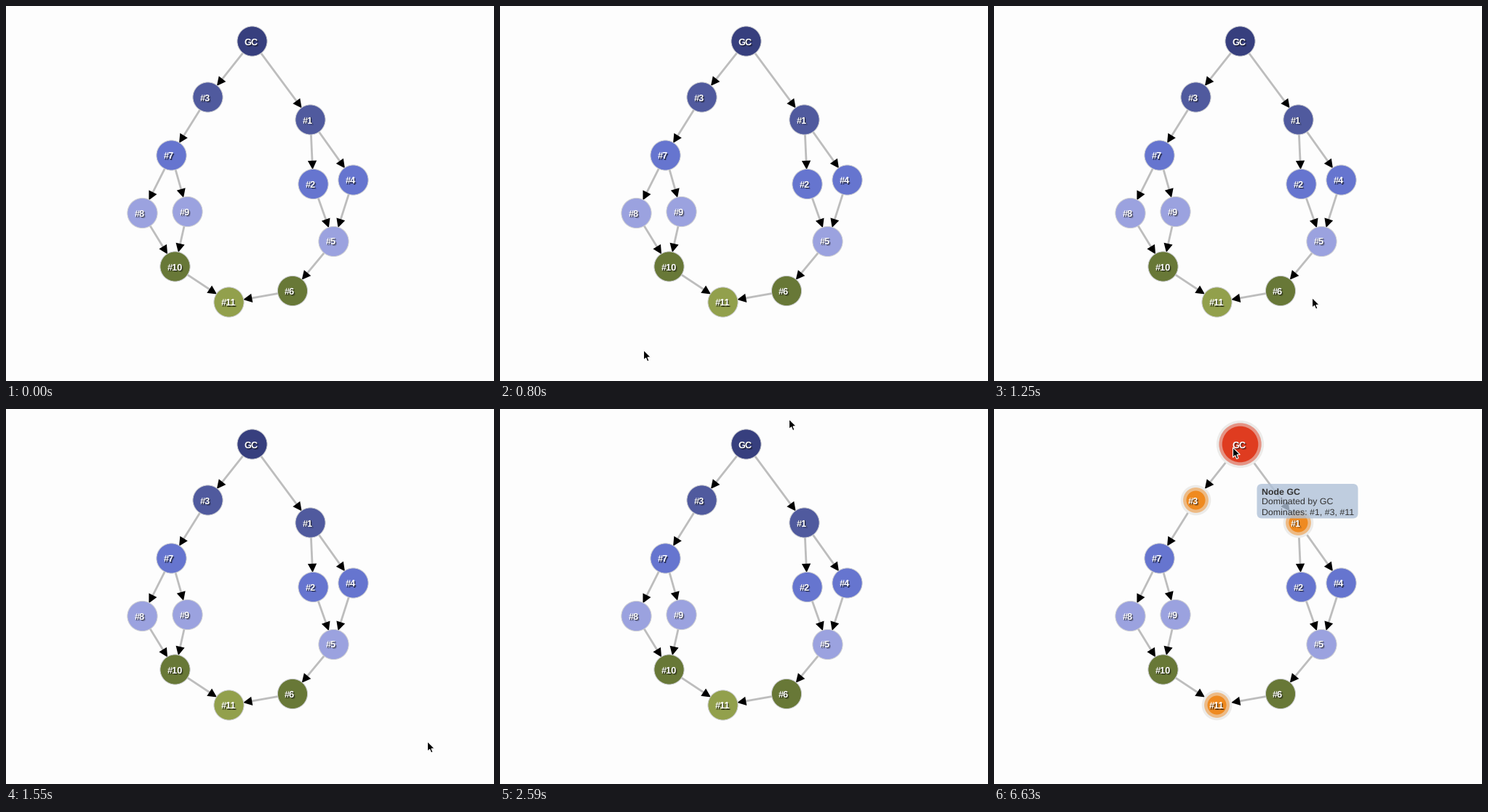
A matplotlib script that plays this animation: 671x516 px, repeating every 8 s.

```python
import matplotlib.pyplot as plt
import numpy as np
from matplotlib.animation import FuncAnimation
from matplotlib.patches import Circle, FancyBboxPatch, Polygon

W, H, DPI = 671, 516, 64
LOOP, STEP = 8000, 20
RADIUS, HEAD = 20.6, 12.3

PLACES = {
    "GC": (338, 48), "#1": (418, 156), "#2": (422, 244.5), "#3": (277, 125),
    "#4": (477, 239), "#5": (450, 323.5), "#6": (393.5, 391.5),
    "#7": (227, 205), "#8": (187, 284.5), "#9": (249, 282.5),
    "#10": (232, 358), "#11": (306, 407),
}
CHAINS = ["GC #3 #7 #8 #10 #11", "#7 #9 #10",
          "GC #1 #2 #5 #6 #11", "#1 #4 #5"]
DEPTH_COLORS = ["#373f7e", "#505a9e", "#6675cf", "#9ba2df",
                "#687837", "#92a04c"]
RED, ORANGE, HALO = "#df3c20", "#ef8a20", "#ecebe9"
DOMINATED = ["#1", "#3", "#11"]

# The pointer sweeps under the graph in equal beats, leaves, then visits GC
SWEEP = [(197, 473), (240.5, 440), (286.5, 411), (437, 401),
         (564, 443), (579, 457), (596, 482)]
SWEEP_START, SWEEP_END = 800, 1840
RETURN, HOVER, DRIFT = 2590, 4540, 6630
ARROW = np.array([(0, 0), (0, 13.6), (3.1, 10.8), (5.1, 15.6),
                  (7.5, 14.6), (5.5, 9.9), (9.8, 9.7)])

plt.rcParams["font.family"] = "Liberation Sans"
plt.rcParams["text.hinting"] = "none"


def px(n):
    return n * 72 / DPI


fig = plt.figure(figsize=(W / DPI, H / DPI), dpi=DPI, facecolor="#fdfdfd")
ax = fig.add_axes([0, 0, 1, 1])
ax.set(xlim=(-0.5, W - 0.5), ylim=(H - 0.5, -0.5))
ax.axis("off")


def disc(center, r, color, z, **kw):
    return ax.add_patch(Circle(center, r, fc=color, zorder=z, **kw))


def write(x, y, text, color, z, size=12.4, weight="bold", alpha=1):
    return ax.text(x, y, text, color=color, size=px(size), weight=weight,
                   alpha=alpha, va="baseline", zorder=z)


def draw_link(a, b):
    p, q = np.array(PLACES[a]), np.array(PLACES[b])
    u = (q - p) / np.hypot(*(q - p))
    tip = q - u * (RADIUS - 0.7)
    base = tip - u * HEAD
    side = np.array([-u[1], u[0]]) * HEAD / 2
    ax.plot(*zip(p, base + u), color="#bdbdbd", lw=px(2.8),
            solid_capstyle="butt", zorder=1)
    ax.add_patch(Polygon([tip, base + side, base - side],
                         fc="black", lw=0, zorder=2))


def draw_label(name):
    x, y = PLACES[name]
    x, y = x - 11, y + 5
    for shift, alpha in [(2, 0.2), (1, 0.55)]:
        write(x + shift, y + shift, name, "black", 5, 12.8, alpha=alpha)
    write(x, y, name, "white", 6, 12.8)


def draw_rings(name, r, color):
    at = PLACES[name]
    return [disc(at, r + 7.8, HALO, 4, lw=0),
            disc(at, r + 4.4, color, 4, lw=0, alpha=0.5),
            disc(at, r, color, 4, lw=0)]


def draw_tooltip(x, y, w, h, lines):
    box = FancyBboxPatch((x, y), w, h, boxstyle="round,pad=0,rounding_size=7",
                         fc="#b0c2d8", alpha=0.8, lw=0, zorder=7)
    parts = [ax.add_patch(box)]
    for i, line in enumerate(lines):
        parts.append(write(x + 7, y + 14.5 * (i + 1), line, "#333333", 8,
                           weight="normal" if i else "bold"))
    return parts


depth = {"GC": 0}
for chain in CHAINS:
    names = chain.split()
    for a, b in zip(names, names[1:]):
        depth[b] = depth[a] + 1
        draw_link(a, b)

nodes = {}
for name, at in PLACES.items():
    nodes[name] = disc(at, RADIUS, DEPTH_COLORS[depth[name]], 3,
                       ec="#cfd0d4", lw=px(1))
    draw_label(name)

plain = [nodes[name] for name in ["GC", *DOMINATED]]
active = draw_rings("GC", 24.8, RED)
for name in DOMINATED:
    active += draw_rings(name, 13, ORANGE)
active += draw_tooltip(361, 102.5, 139, 47.5, [
    "Node GC", "Dominated by GC", "Dominates: " + ", ".join(DOMINATED)])

pointer = ax.add_patch(Polygon(ARROW, fc="black", ec="white",
                               lw=px(1.1), zorder=9))


def pointer_tip(t):
    if SWEEP_START <= t < SWEEP_END:
        share = (t - SWEEP_START) / (SWEEP_END - SWEEP_START)
        return SWEEP[int(share * len(SWEEP))]
    if t < RETURN:
        return None
    if t < HOVER:
        return 397, 13.5
    return (344, 38) if t < DRIFT else (328, 52.5)


def update(i):
    t = (i + 1) * STEP - 1  # a change inside a step shows at once
    for art in plain:
        art.set_visible(t < HOVER)
    for art in active:
        art.set_visible(t >= HOVER)
    tip = pointer_tip(t)
    pointer.set_visible(tip is not None)
    if tip:
        pointer.set_xy(ARROW + tip)
    return [*plain, *active, pointer]


anim = FuncAnimation(fig, update, frames=LOOP // STEP, interval=STEP,
                     init_func=lambda: update(0), repeat=True, repeat_delay=0)
plt.show()
```
